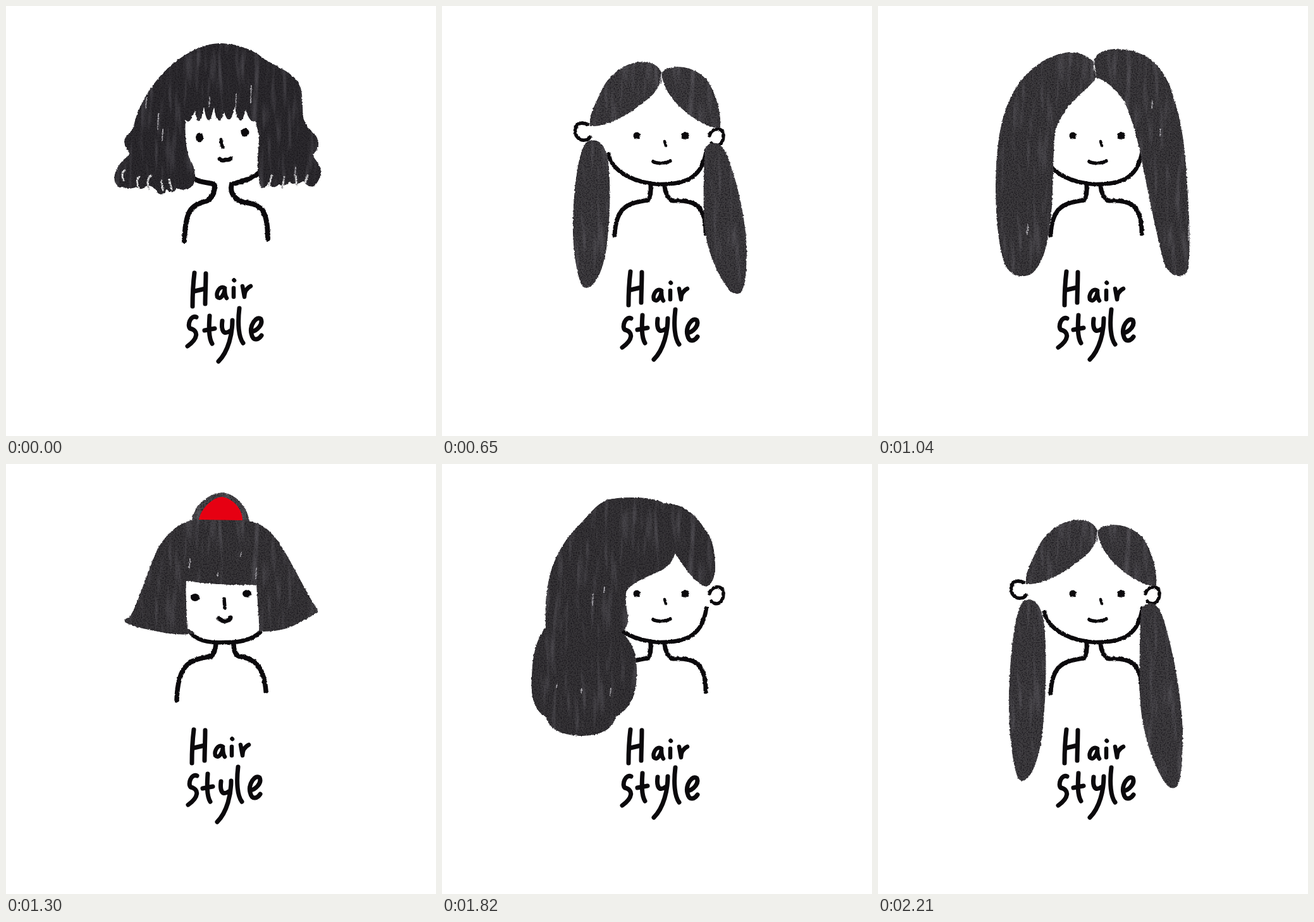
Write an HTML page that moves like this. It is 680 px wide and 680 px high and loops after 2.34 s.

```html
<!DOCTYPE html>
<html lang="en">
<head>
<meta charset="utf-8">
<title>Hair style</title>
<style>
html, body { margin: 0; height: 100%; overflow: hidden; background: #fff; }
svg { display: block; width: 100vw; height: 100vh; }
.line { fill: none; stroke: #0b090c; stroke-linecap: round; stroke-linejoin: round; }
.speck { stroke: #c4c2c7; stroke-width: 1.8; stroke-linecap: round; }
.gap { fill: none; stroke: #fff; stroke-width: 3; stroke-linecap: round; }
</style>
</head>
<body>
<svg viewBox="0 0 680 680" role="img" aria-label="Hair style">
  <defs>
    <filter id="ink" filterUnits="userSpaceOnUse" x="130" y="30" width="400" height="500" color-interpolation-filters="sRGB">
      <feTurbulence type="fractalNoise" baseFrequency=".25" numOctaves="2" seed="3"/>
      <feDisplacementMap in="SourceGraphic" scale="3" xChannelSelector="R" yChannelSelector="G"/>
    </filter>
    <filter id="marker" filterUnits="userSpaceOnUse" x="130" y="30" width="400" height="500" color-interpolation-filters="sRGB">
      <feTurbulence type="fractalNoise" baseFrequency=".3" numOctaves="2" seed="5" result="rough"/>
      <feDisplacementMap in="SourceGraphic" in2="rough" scale="3" xChannelSelector="R" yChannelSelector="G" result="hair"/>
      <feTurbulence type="fractalNoise" baseFrequency=".5" numOctaves="2" seed="8"/>
      <feColorMatrix values="0 0 0 0 .08  0 0 0 0 .07  0 0 0 0 .09  2.2 0 0 0 -.9" result="grain"/>
      <feTurbulence type="fractalNoise" baseFrequency=".11 .015" numOctaves="2" seed="2"/>
      <feColorMatrix values="0 0 0 0 .45  0 0 0 0 .44  0 0 0 0 .47  1.2 0 0 0 -.62" result="streaks"/>
      <feMerge result="paint">
        <feMergeNode in="hair"/><feMergeNode in="grain"/><feMergeNode in="streaks"/>
      </feMerge>
      <feComposite in="paint" in2="hair" operator="in"/>
    </filter>
  </defs>
  <g id="stage"></g>
</svg>
<script>
const STEP = 130;
const line = (d, w = 6.5) => `<path class="line" stroke-width="${w}" d="${d}"/>`;
const eye = (x, y, rx, ry = rx) => `<ellipse cx="${x}" cy="${y}" rx="${rx}" ry="${ry}" fill="#0b090c"/>`;
const fill = (d, color) => `<path fill="${color}" d="${d}"/>`;
const gaps = d => `<path class="gap" d="${d}"/>`;
const specks = list => list.map(([x, y, h]) => `<path class="speck" d="M${x},${y}l-1,${h}"/>`).join('');
const wrap = (content, transform) => `<g transform="${transform}">${content}</g>`;

const letters = [
  line('M298,420C296,436 295,455 295,473M316,421C316,438 315,455 315,469M298,449L315,445', 7),
  line('M347,450C339,445 333,457 335,464C340,470 346,460 347,452Q347,462 350,466M361,450L361,464M361.5,437.5L362,438M375,447L378,464Q378,452 388,447'),
  line('M299,494C290,490 284,507 289,512C303,515 302,528 285,540', 7),
  line('M317,489C316,505 315,523 321,533M309,512L325,509', 7),
  line('M341,495C339,510 343,518 353,511M357,494C357,515 351,543 335,559', 7),
  line('M369,480C366,505 368,526 375,535M388,517C397,516 407,505 403,497C396,491 385,507 388,520C391,534 400,529 404,523', 7)
];
// Offsets for H, air, s, t, y, le in each hand-drawn version.
const nudges = {
  A: [[0, 0], [0, 0], [0, 0], [0, 0], [0, 0], [0, 0]],
  B: [[0, 2], [-1, -4], [2, -2], [5, 1], [1, 3], [0, -2]],
  C: [[-1, 0], [-4, -3], [3, -1], [2, 1], [-1, 7], [-2, -1]]
};
const lettering = face => letters.map((part, i) => wrap(part, `translate(${nudges[face][i]})`)).join('');

const faces = {
  A: eye(308, 205, 5.5) + eye(384, 205, 6) +
    line('M352,214L354,221', 4.5) + line('M334,246Q337,249 347,248Q358,248 361,245', 5.5) +
    line('M263,234C270,265 310,281 345,282C385,282 412,272 418,228') +
    line('M330,285Q331,303 325,307C300,312 275,312 273,363M352,285Q355,305 365,308C395,306 418,312 417,360', 7),
  B: eye(306, 208, 6, 7.5) + eye(378, 200, 6.5) +
    line('M340,211Q340,217 343,224', 5) + line('M338,242Q342,246 347,243Q354,244 355,241') +
    line('M299,274C310,281 327,278 330,284C330,296 325,304 318,308C290,316 284,325 282,371M400,264C388,274 370,278 357,282C354,292 358,303 372,309C400,315 414,315 414,368', 8),
  C: eye(299, 211, 7, 6) + eye(381, 205, 7, 6) +
    line('M345,213L346,228', 5.5) + line('M337,244Q341,249 348,248Q354,247 355,243', 7) +
    line('M293,268C305,282 330,283 345,282C370,283 390,277 402,266') +
    line('M332,284Q331,298 325,304C290,310 272,315 270,373M360,284Q360,300 368,304C395,308 408,322 411,359', 7.5)
};

const rightEar = line('M423,205C425,193 445,189 445,205C445,222 432,224 426,217', 5.5);
const ears = rightEar + line('M230,187C212,180 207,195 213,206C220,216 232,212 234,207', 5.5);

const wavy = fill('M336,59C302,60 267,87 252,102C227,127 209,160 203,185C202,200 186,205 187,215C188,228 200,232 192,238C182,245 168,262 172,278Q176,290 184,286Q193,290 206,287Q215,293 222,284Q235,284 240,296Q249,302 254,290Q264,300 270,288Q280,294 292,287C300,280 302,270 295,250C284,235 283,200 284,180Q288,186 292,180L299,166Q302,190 309,178L313,160Q317,188 324,178L329,160Q333,190 341,178L345,168Q350,186 357,176L362,160Q366,186 374,180L379,165Q386,186 394,182L399,200C402,215 396,240 398,262C402,275 398,285 404,287Q410,290 415,280Q421,292 432,282Q440,288 448,278Q456,286 470,277Q478,288 487,285Q498,275 498,262C498,250 487,243 486,235C495,225 497,215 490,205C480,195 474,190 470,175C468,140 470,128 457,114C440,97 417,92 400,77C380,63 350,58 336,59Z', '#2d2b2f') +
  gaps('M186,276Q181,263 188,260M210,288Q204,276 211,270M226,290Q221,275 229,268M248,291L246,276M262,290L258,274M437,287L440,270M460,284L458,268M473,279L477,268M416,284L420,268') +
  specks([[388, 125, 28], [364, 140, 22], [241, 170, 25], [248, 195, 18], [322, 145, 15], [222, 145, 16], [458, 255, 12]]);

const side = fill('M262,56C295,50 335,52 352,62C385,62 405,85 415,102C428,115 433,140 432,170Q429,190 418,194C400,190 385,165 369,142C360,165 345,170 330,176C305,187 293,195 291,205Q290,220 294,240Q296,258 284,266C305,285 309,305 308,335C307,365 300,385 275,400C270,420 250,430 222,430C195,430 170,422 164,400C145,390 139,365 142,335C143,300 150,275 164,258C162,225 165,195 172,170C178,150 190,125 210,103C230,85 240,65 262,56Z', '#373538') +
  specks([[239, 205, 18], [257, 195, 8], [267, 355, 12], [182, 348, 6], [221, 355, 6]]);

const cap = fill('M347,107C345,92 325,86 308,89C285,92 262,112 253,132C242,155 232,172 234,190C260,192 295,172 315,155C335,142 347,128 347,107ZM347,108Q350,97 372,96C395,96 415,108 424,125C435,145 442,170 440,192C430,196 410,185 395,175C375,160 352,140 347,108Z', '#403e41') +
  specks([[347, 108, 14]]);
const tails = fill('M238,212C252,212 262,225 264,255C268,310 264,350 260,385C255,415 245,440 232,445Q224,448 220,440C210,415 206,370 207,340C208,290 215,230 228,216Q232,212 238,212ZM428,217C440,214 450,228 456,250C470,290 480,340 482,380C482,420 480,445 472,454Q464,458 455,450C435,425 420,390 415,350C412,310 414,250 416,225Q420,218 428,217Z', '#403e41');
const pigtails = cap + tails;
const longPigtails = cap + wrap(tails, 'matrix(1 0 0 1.227 0 -46)');

const straight = fill('M343,95C340,78 310,70 295,74C262,80 230,105 212,140C190,180 186,240 186,290C186,340 192,390 202,412C212,428 232,432 245,422C262,405 270,375 274,330C278,290 276,240 280,200C288,170 310,148 325,135Q340,122 345,113ZM341,90C344,70 365,66 390,69C425,72 450,95 463,130C480,180 487,220 490,300C493,340 494,380 491,415Q487,428 475,427Q458,424 452,405C440,360 428,300 418,250C412,215 402,180 390,152C375,130 360,118 345,113Z', '#3d3b3e') +
  specks([[342, 84, 18], [237, 345, 16], [434, 150, 12], [447, 195, 10], [492, 340, 30]]);

const bob = fill('M300,87C340,86 375,86 391,92C412,97 423,112 433,126C453,156 475,205 494,232Q482,243 465,250C450,260 430,266 400,265C401,250 397,215 396,191Q340,193 285,185C284,210 286,240 287,260L300,268Q280,272 250,267C225,262 200,258 188,250Q186,244 195,243C210,220 224,165 242,130C257,108 272,93 300,87Z', '#39373a') +
  specks([[396, 165, 16], [291, 150, 14], [372, 140, 6], [335, 172, 5]]);
const band = fill('M294,88C298,62 325,45 342,45C363,47 381,66 385,90Z', '#4a484c');
const red = fill('M305,88C308,70 328,52 342,52C360,55 374,72 374,89Z', '#e60012');

// Three drawn faces take turns, each wearing its own series of hairstyles.
const spread = (hair, scale, shift) => wrap(hair, `matrix(${scale} 0 0 1 ${shift} 0)`);
const draw = (face, hair, { behind = '', front = '' } = {}) =>
  `<g filter="url(#ink)">${faces[face]}${behind}</g>` +
  `<g filter="url(#marker)">${hair}</g>${front}` + lettering(face);

const sideSwept = draw('A', side, { behind: rightEar });
const poses = [
  draw('B', wavy), draw('C', bob), sideSwept,
  draw('B', spread(wavy, 1.04, -10)), draw('C', bob), draw('A', pigtails, { behind: ears }),
  draw('B', spread(wavy, 1.1, -28)), draw('C', bob), draw('A', straight),
  draw('B', wavy), draw('C', band + bob, { front: red }), draw('A', straight),
  draw('B', spread(wavy, 1.08, -20)), draw('C', bob), sideSwept,
  draw('B', spread(wavy, .96, 3)), draw('C', spread(bob, .95, 12)), draw('A', longPigtails, { behind: ears })
];

const stage = document.getElementById('stage');
let shown = -1;
function tick() {
  const pose = Math.floor(performance.now() / STEP) % poses.length;
  if (pose !== shown) stage.innerHTML = poses[shown = pose];
  requestAnimationFrame(tick);
}
tick();
</script>
</body>
</html>
```
